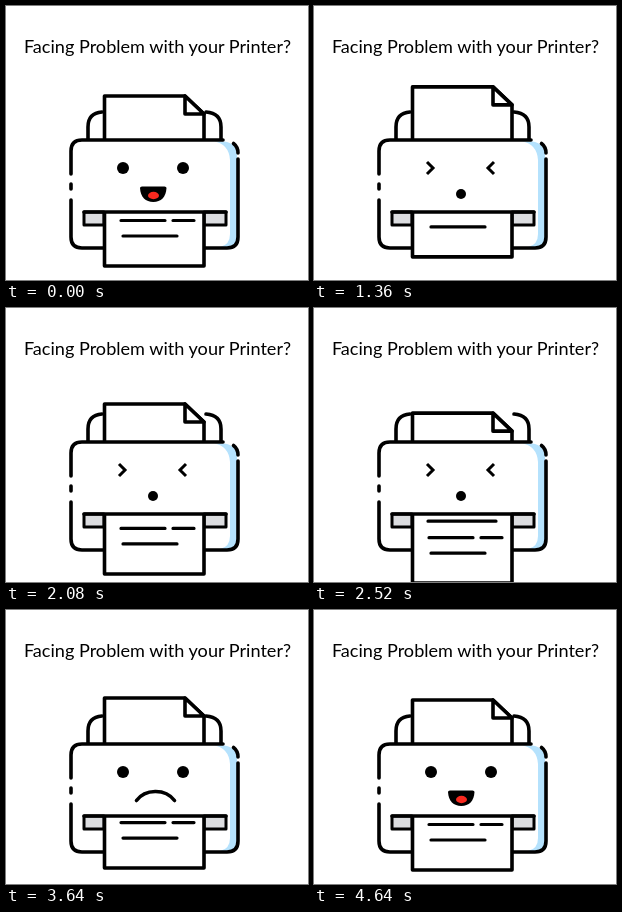
Animation of 302 by 274 pixels, one loop 5760 ms. Source, as an HTML page:

```html
<!DOCTYPE html>
<html lang="en">
<head>
<meta charset="utf-8">
<title>Printer</title>
<style>
  html, body { margin: 0; width: 100%; height: 100%; overflow: hidden; background: #fff; }
  svg { display: block; width: 302px; height: 274px; }
  text { font: 18.1px Lato, Carlito, sans-serif; fill: #000; stroke: none; }
  .line { fill: none; }
  .solid { fill: #000; stroke: none; }
</style>
</head>
<body>
<svg viewBox="0 0 302 274" fill="#fff" stroke="#000" stroke-width="3.6" stroke-linecap="round" stroke-linejoin="round">
  <clipPath id="below"><rect x="60" y="206" width="180" height="68"/></clipPath>
  <text x="151.5" y="47" text-anchor="middle">Facing Problem with your Printer?</text>

  <path class="line" d="M82 133V121Q82 107 96 106M200 106Q215 107 215 121V133"/>
  <g class="paper">
    <path d="M98.500 180V90H179L198 108V180Z"/>
    <path d="M179 90V108H198Z"/>
  </g>

  <path id="body" stroke="none"/>
  <path id="shade" fill="#b5e2fd" stroke="none"/>
  <path id="outline" class="line"/>

  <path fill="#dcdde0" stroke-width="3" d="M78 206H98V219H78ZM198 206H220V219H198Z"/>
  <g clip-path="url(#below)">
    <g class="paper">
      <path d="M98.500 150H198V260H98.500Z"/>
      <path class="line" stroke-width="3.2" d="M114 198H182M115 214.500H159M167 214.500H188M117 230H171"/>
    </g>
  </g>
  <path class="line" d="M78 206H220"/>

  <g id="eyes" class="solid"><circle cx="117" cy="162" r="6"/><circle cx="177" cy="162" r="6"/></g>
  <path id="squint" class="line" stroke-width="3" stroke-linecap="butt" stroke-linejoin="miter" d="M113 156L119 162L113 168M180 156L174 162L180 168"/>
  <g id="smile" stroke="none">
    <path class="solid" d="M134 182Q134 180.500 136 180.500H158.500Q160.500 180.500 160.500 182C160 191 155 196 147.300 196S134.500 191 134 182Z"/>
    <ellipse cx="147.500" cy="189.500" rx="5.500" ry="3.700" fill="#f9291f"/>
  </g>
  <circle id="gasp" class="solid" cx="147"/>
  <path id="frown" class="line" d="M130.500 190.500C139 179 159 178 168.500 190.500"/>
</svg>
<script>
const LOOP = 5760;
const el = id => document.getElementById(id);
const papers = document.querySelectorAll('.paper');

// Paper offset in pixels at key times (ms)
const feed = [[0, 0], [480, 0], [760, -15], [1080, -15], [2800, 21], [4120, -15], [4640, 0], [LOOP, 0]];

function feedAt(t) {
  const i = feed.findIndex(key => key[0] > t);
  const [t0, y0] = feed[i - 1], [t1, y1] = feed[i];
  return y0 + (y1 - y0) * (t - t0) / (t1 - t0);
}

function show(id, visible) {
  el(id).style.display = visible ? '' : 'none';
}

function drawBody(lift) {
  const y = d => 134 - lift + d;
  el('body').setAttribute('d',
    `M76 ${y(0)}H220Q232 ${y(0)} 232 ${y(13)}V231Q232 242 221 242H76Q65 242 65 231V${y(11)}Q65 ${y(0)} 76 ${y(0)}Z`);
  el('shade').setAttribute('d',
    `M208 ${y(1.5)}H218Q231 ${y(3)} 231 ${y(16)}V231Q231 241 220 241H214Q224 239 224 228V${y(20)}Q223 ${y(4)} 208 ${y(1.5)}Z`);
  el('outline').setAttribute('d',
    `M98 242H76Q65 242 65 231V194M65 183V178M65 168V${y(11)}Q65 ${y(0)} 76 ${y(0)}H217` +
    `M227.5 ${y(3.5)}Q232 ${y(7)} 232 ${y(13)}M232 ${y(19)}V231Q232 242 221 242H198`);
}

function draw(t) {
  const offset = feedAt(t);
  papers.forEach(p => p.setAttribute('transform', `translate(0 ${offset})`));

  const jump = t > 480 && t < 1040 ? Math.sin((t - 480) / 560 * Math.PI) : 0;
  drawBody(6 * jump);

  const squinting = t >= 1060 && t < 3200;
  const sad = t >= 3200 && t < 4120;
  const gasping = t >= 500 && t < 3200;
  show('squint', squinting);
  show('eyes', !squinting);
  show('frown', sad);
  show('gasp', gasping);
  show('smile', !sad && !gasping);
  el('gasp').setAttribute('r', 5 + 6 * jump);
  el('gasp').setAttribute('cy', 188 - 5 * jump);
}

function tick() {
  draw(performance.now() % LOOP);
  requestAnimationFrame(tick);
}
tick();
</script>
</body>
</html>
```
